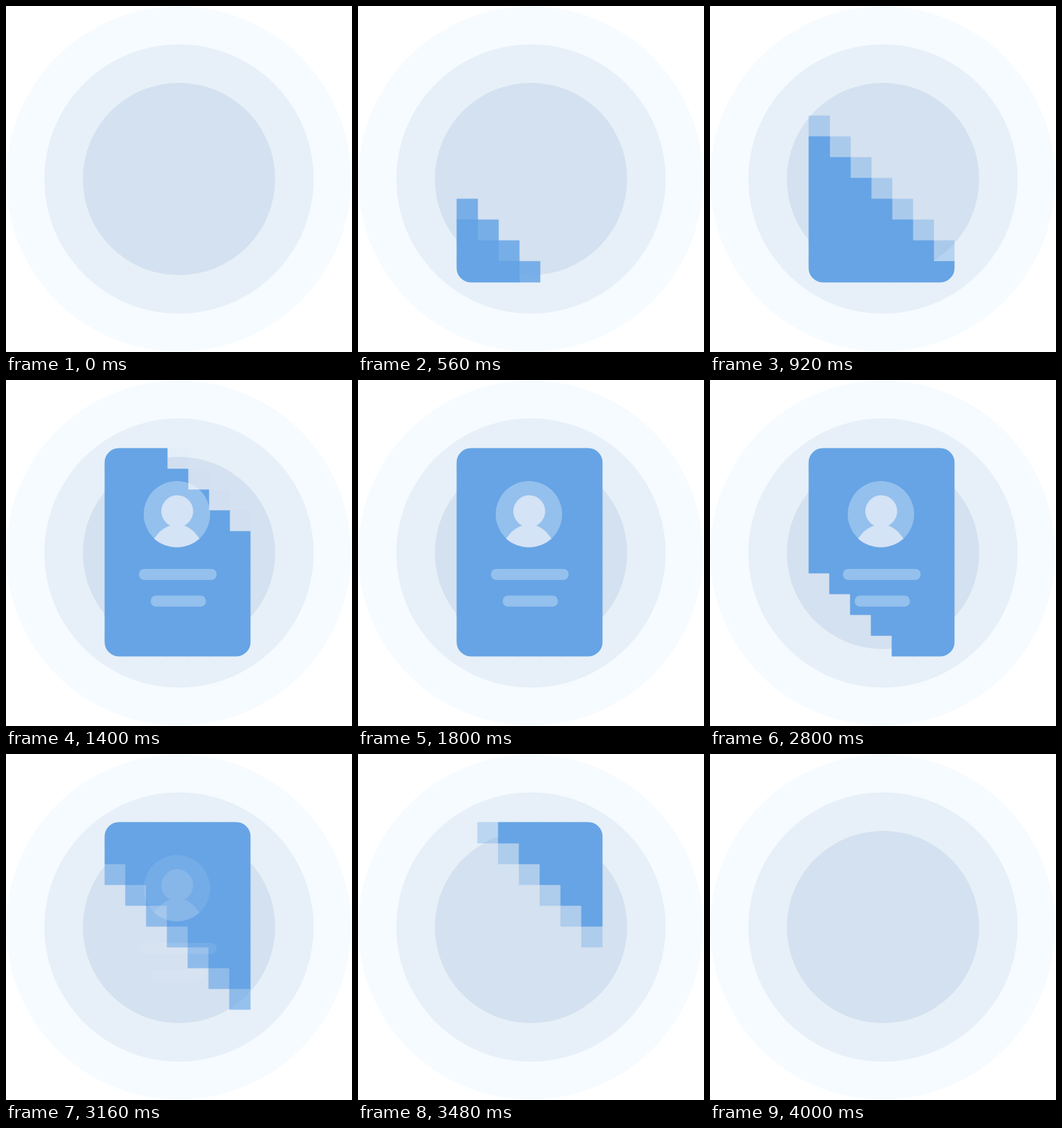
An HTML page for the animation above (5040 ms loop, 500 px wide and 500 px high).

```html
<!DOCTYPE html>
<html lang="en">
<head>
<meta charset="utf-8">
<title>Profile card</title>
<style>
  html, body { margin: 0; width: 100%; height: 100%; overflow: hidden; background: #fff; }
  svg { display: block; width: 100vw; height: 100vh; }
</style>
</head>
<body>
<svg viewBox="0 0 500 500">
  <clipPath id="card"><rect x="142.3" y="98.2" width="211.3" height="301.45" rx="21.5"/></clipPath>
  <circle cx="249.5" cy="250" r="249.2" fill="#f5fbff"/>
  <circle cx="250" cy="250" r="194.5" fill="#e7f0f8"/>
  <circle cx="250" cy="250" r="139" fill="#d4e1f0"/>
  <g id="tiles" clip-path="url(#card)" fill="#66a4e5"></g>
  <g id="profile" fill="#fff">
    <g fill-opacity=".3">
      <circle cx="247" cy="194" r="48"/>
      <rect x="192" y="273" width="112.5" height="16" rx="8"/>
      <rect x="209" y="311.5" width="80" height="16" rx="8"/>
    </g>
    <path fill="#d4e3f5" d="M214 229.5C220 220 228 213.5 237.5 210.3A23 23 0 1 1 257.5 210.3C266 213.5 274 220 279.5 229.5A50 50 0 0 1 214 229.5Z"/>
  </g>
</svg>
<script>
  const LOOP = 5040, COLS = 7, ROWS = 10, STEP = 30.05, TILE = 31;
  const SHOW = 200, HIDE = 2400, STAGGER = 100, FADE = 100;
  const SVG = 'http://www.w3.org/2000/svg';

  function add(parent, tag, attributes = {}) {
    const node = parent.appendChild(document.createElementNS(SVG, tag));
    for (const key in attributes) node.setAttribute(key, attributes[key]);
    return node;
  }

  const tiles = document.getElementById('tiles');
  const profile = document.getElementById('profile');

  // One group per diagonal, counted from the bottom left corner.
  const diagonals = Array.from({ length: COLS + ROWS - 1 }, () => add(tiles, 'g'));
  for (let row = 0; row < ROWS; row++) {
    for (let col = 0; col < COLS; col++) {
      add(diagonals[col + ROWS - 1 - row], 'rect', {
        x: 142.3 + col * STEP, y: 98.2 + row * STEP, width: TILE, height: TILE
      });
    }
  }

  const clamp = x => Math.min(1, Math.max(0, x));
  const easeOut = x => 1 - (1 - x) ** 2;
  const visible = (t, show, hide, fade) =>
    clamp((t - show) / fade) - clamp((t - hide) / fade);

  function draw(t) {
    diagonals.forEach((group, i) => {
      const delay = i * STAGGER;
      group.setAttribute('opacity', easeOut(visible(t, SHOW + delay, HIDE + delay, FADE)));
    });
    profile.setAttribute('opacity', visible(t, 1000, 2950, 300));
  }

  function frame() {
    draw(performance.now() % LOOP);
    requestAnimationFrame(frame);
  }
  frame();
</script>
</body>
</html>
```
